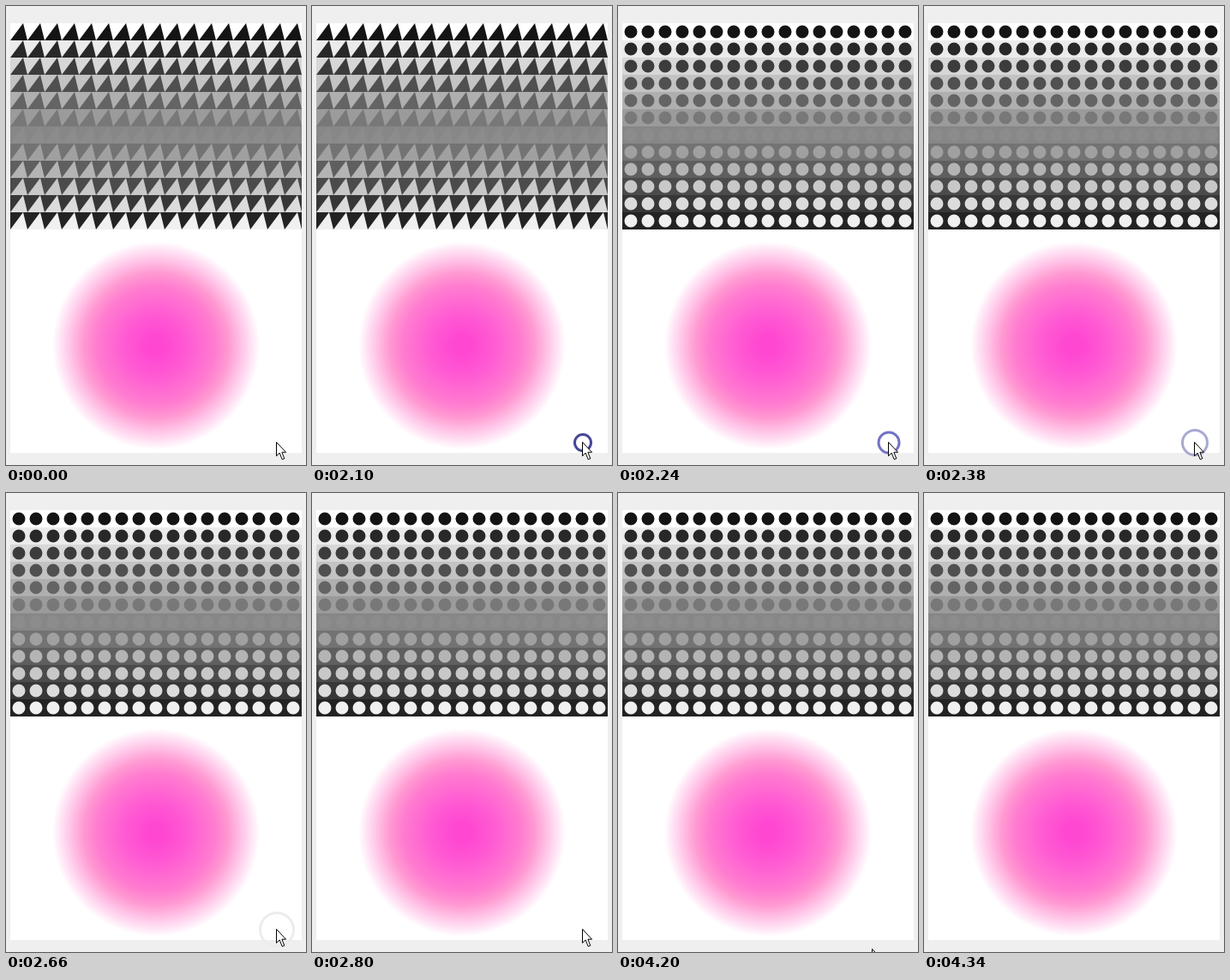
An HTML page that plays this animation: 350 px wide and 534 px high, repeating every 6.19 s.

```html
<!DOCTYPE html>
<html lang="en">
<head>
<meta charset="utf-8">
<title>Rows and glow</title>
<style>
  html, body { margin: 0; width: 100%; height: 100%; overflow: hidden; background: #efefef; }
  svg { display: block; width: 350px; height: 534px; }
  #triangles, #dots, #ring, #cursor { animation: 6190ms step-end infinite; }
  #triangles { animation-name: triangles; }
  #dots { animation-name: dots; }
  #ring { animation-name: ring; fill: none; stroke-width: 3; }
  #cursor { animation-name: cursor; fill: #fff; stroke: #000; }

  @keyframes triangles {
    0% { visibility: visible; }
    36.18%, 100% { visibility: hidden; }
  }
  @keyframes dots {
    0% { visibility: hidden; }
    36.18%, 100% { visibility: visible; }
  }
  @keyframes ring {
    0% { visibility: hidden; r: 9.5px; stroke: #464699; }
    33.92% { visibility: visible; r: 9.5px; stroke: #464699; }
    36.18% { visibility: visible; r: 12px; stroke: #7373c6; }
    38.44% { visibility: visible; r: 14.5px; stroke: #a8a8d2; }
    40.71% { visibility: visible; r: 17px; stroke: #d2d2d2; }
    42.97% { visibility: visible; r: 19.5px; stroke: #ececec; }
    45.23%, 100% { visibility: hidden; r: 19.5px; stroke: #ececec; }
  }
  @keyframes cursor {
    0% { visibility: visible; transform: translate(315px, 507px); }
    67.85% { visibility: visible; transform: translate(296px, 530px); }
    70.11%, 100% { visibility: hidden; transform: translate(296px, 530px); }
  }
</style>
</head>
<body>
<svg viewBox="0 0 350 534">
  <defs>
    <radialGradient id="glow" gradientUnits="userSpaceOnUse" cx="175" cy="395" r="121">
      <stop offset="0" stop-color="#ff46d2"/>
      <stop offset=".1" stop-color="#ff48d2"/>
      <stop offset=".3" stop-color="#ff5ad3"/>
      <stop offset=".57" stop-color="#ff7cd0"/>
      <stop offset=".7" stop-color="#ff9ad2"/>
      <stop offset=".82" stop-color="#ffc2e6"/>
      <stop offset=".93" stop-color="#ffe6f6"/>
      <stop offset="1" stop-color="#fff"/>
    </radialGradient>
  </defs>
  <rect x="5" y="20" width="340" height="500" fill="#fff"/>
  <circle cx="175" cy="395" r="121" fill="url(#glow)"/>
  <g id="bands" shape-rendering="crispEdges"></g>
  <g id="triangles"></g>
  <g id="dots"></g>
  <circle id="ring" cx="316" cy="508" r="9.5"/>
  <path id="cursor" d="M.5 .5V16.5L4.2 13L7.2 20.5L9.8 19.5L6.9 12.2H11.6Z"/>
</svg>
<script>
  const CELL = 20, COLS = 17, ROWS = 12, LEFT = 5, TOP = 20;
  const gray = v => `rgb(${v},${v},${v})`;

  function addPath(group, d, fill) {
    const path = document.createElementNS('http://www.w3.org/2000/svg', 'path');
    path.setAttribute('d', d);
    path.setAttribute('fill', fill);
    document.getElementById(group).append(path);
  }

  const across = (y, shape) =>
    Array.from({ length: COLS }, (_, i) => `M${LEFT + i * CELL} ${y}${shape}`).join('');

  for (let row = 0; row < ROWS; row++) {
    const y = TOP + row * CELL;
    const ink = gray(20 + row * 20);
    addPath('bands', `M${LEFT} ${y}h${COLS * CELL}v${CELL}H${LEFT}z`, gray(255 - row * 20));
    addPath('triangles', across(y, 'm0 20l15 -20l5 20z'), ink);
    addPath('dots', across(y, 'm2.5 10a7.5 7.5 0 1 1 15 0a7.5 7.5 0 1 1 -15 0z'), ink);
  }
</script>
</body>
</html>
```
